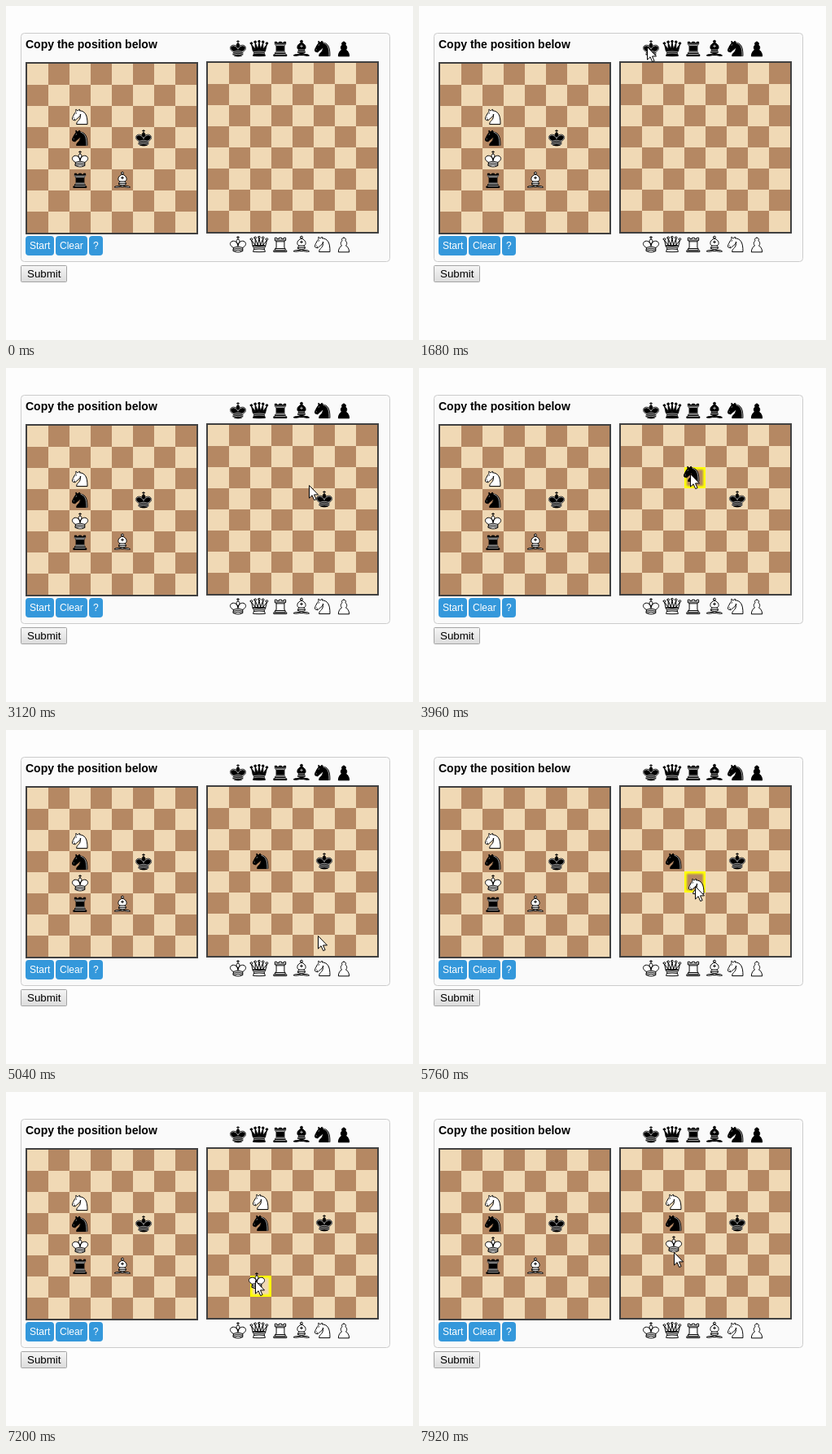
An HTML page for the animation above (8000 ms loop, 500x411 px).

```html
<!DOCTYPE html>
<html lang="en">
<head>
<meta charset="utf-8">
<title>Copy the position</title>
<style>
  html, body { margin: 0; width: 100%; height: 100%; overflow: hidden; background: #fdfdfd; }
  svg { display: block; }
  text { font-family: "Liberation Sans", Arial, sans-serif; }
  .piece { stroke: #000; stroke-width: 1.7; stroke-linecap: round; stroke-linejoin: round; }
  .light { stroke: #eee; stroke-width: 1.2; }
</style>
</head>
<body>
<svg id="stage" width="500" height="411" viewBox="0 0 500 411">
  <defs>
    <linearGradient id="face" x2="0" y2="1">
      <stop stop-color="#f5f5f5"/><stop offset="1" stop-color="#dcdcdc"/>
    </linearGradient>
  </defs>
  <rect x="18.5" y="33.5" width="453" height="281" rx="4" fill="#fafafa" stroke="#ccc"/>
  <text x="24" y="52" font-size="14" font-weight="bold">Copy the position below</text>
  <g id="buttons" font-size="12"></g>
  <rect x="18.5" y="319.5" width="56" height="20" rx="1" fill="url(#face)" stroke="#a3a3a3"/>
  <text x="26" y="334" font-size="13.333">Submit</text>
  <g id="boards"></g>
  <svg id="hover" width="26" height="26">
    <rect x="-2" y="-2" width="30" height="30" fill="none" stroke="#ff0" stroke-width="10" style="filter:blur(1px)"/>
  </svg>
  <g id="pieces"></g>
  <path id="cursor" d="M.5.5v15.6l3.6-3.4 2.6 5.9 2.4-1-2.6-5.7h5z" fill="#fff" stroke="#000"/>
</svg>
<script>
const $ = id => document.getElementById(id);
const CELL = 26, LOOP = 8000, TICK = 120;
const LEFT = { x: 26, y: 71 }, RIGHT = { x: 248, y: 70 };

// Piece shapes live on a 45-unit grid, symmetric about MID
const MID = 22.5;
const ball = (x, y, r) => `M${x - r} ${y}a${r} ${r} 0 1 0 ${2 * r} 0 ${r} ${r} 0 1 0-${2 * r} 0z`;
const bar = (y, half) => `M${MID - half} ${y}h${2 * half}`;
const slab = (y, half, height) => `${bar(y, half)}v${height}h${-2 * half}z`;
const arch = (y, half, rise) => `M${MID - half} ${y}q${half} ${-rise} ${2 * half} 0`;

function queenCrown() {
  let balls = '', rim = 'M9 26';
  for (let i = -2; i <= 2; i++) {
    const x = MID + 8.25 * i, y = 8 + i * i;
    balls += ball(x, y, 2.2);
    rim += `L${x} ${y + 2}`;
    if (i < 2) rim += `L${MID + 5.6 * (i + .5)} 24.7`;
  }
  return balls + rim + 'L36 26z';
}

// body: filled outline; lines: inner detail; light: extra detail on black pieces
const SHAPES = {
  K: {
    body: 'M22.5 11.6V6M20 8h5M22.5 25s4.5-7.5 3-10.5c-1-3.3-5-3.3-6 0-1.5 3 3 10.5 3 10.5' +
      'M12.5 37c5.5 3.5 14.5 3.5 20 0v-7s9-4.5 6-10.5c-4-6.5-13.5-3.5-16 4V27v-3.5c-2.5-7.5-12-10.5-16-4-3 6 6 10.5 6 10.5z',
    lines: [30, 33.5, 37].map(y => arch(y, 10, 4.5)).join(''),
    light: 'M32 29.5s8.5-4 6-9.7C34.1 14 25 18 22.5 24.6 20 18 10.9 14 7 19.9c-2.5 5.6 4.9 9 4.9 9'
  },
  Q: {
    body: queenCrown() + 'M9 26c0 4 4 4 2 9l-1.5 3.5c6.5 1 19.5 1 26 0L34 35c-2-5 2-5 2-9-8.5-1.5-18.5-1.5-27 0z',
    lines: arch(30, 11, 1.5) + arch(33.5, 10.5, 1.5)
  },
  R: {
    body: slab(36, 13.5, 3) + slab(32, 10.5, 4) +
      'M11 14V9h4v2h5V9h5v2h5V9h4v5l-3 3H14zM31 17v12.5l1.5 2.5h-20l1.5-2.5V17',
    lines: bar(14, 11.5),
    light: bar(35.5, 10.5) + bar(31.5, 9.5) + bar(29.5, 8.5) + bar(16.5, 8.5)
  },
  B: {
    body: ball(MID, 8, 2.5) +
      'M9 36c3.4-1 10.1.4 13.5-2 3.4 2.4 10.1 1 13.5 2l3 2c-4 2-12-1.5-16.5-.5-4.5-1-12.5 2.5-16.5.5z' +
      'M15 32c2.5 2.5 12.5 2.5 15 0 .5-1.5 0-2 0-2 0-2.5-2.5-4-2.5-4 5.5-1.5 6-11.5-5-15.5-11 4-10.5 14-5 15.5 0 0-2.5 1.5-2.5 4 0 0-.5.5 0 2z',
    lines: bar(26, 5) + bar(30, 7.5) + bar(18, 2.5) + 'M22.5 15.5v5'
  },
  N: {
    body: 'M22 10c10.5 1 16.5 8 16 29H15c0-9 10-6.5 8-21' +
      'M24 18c.4 2.9-5.6 7.4-8 9-3 2-2.8 4.3-5 4-1-.9 1.4-3 0-3-1 0 .2 1.2-1 2-1 0-4 1-4-4 0-2 6-12 6-12s1.9-1.9 2-3.5c-.7-1-.5-2-.5-3 1-1 3 2.5 3 2.5h2s.8-2 2.5-3c1 0 1 3 1 3',
    lines: 'M9 25.5h.1M14.7 15l-.5 1',
    light: 'M24.5 11.2C32 13 37 20 36.3 39'
  },
  P: {
    body: 'M22.5 9c-4 0-5.5 4-3.2 6.4-3.6 2-4.5 7.6-.9 10.6-3 1.1-7.4 5.6-7.4 13.5h23c0-7.9-4.4-12.4-7.4-13.5 3.6-3 2.7-8.6-.9-10.6C28 13 26.5 9 22.5 9z',
    lines: ''
  }
};

// Upper-case codes are white, lower-case black
function piece(code, cx, cy) {
  const { body, lines, light = '' } = SHAPES[code.toUpperCase()];
  const black = code > 'Z';
  return `<g class="piece" transform="translate(${cx - 13} ${cy - 13}) scale(${CELL / 45})">
    <path d="${body}" fill="${black ? '#000' : '#fff'}"/>
    <path d="${black ? lines + light : lines}" fill="none" class="${black ? 'light' : ''}"/></g>`;
}

// A man is a piece code and its square, such as "Nc6"
const place = (board, [code, file, rank]) => piece(code,
  board.x + (file.charCodeAt(0) - 97) * CELL + 13,
  board.y + (8 - rank) * CELL + 13);

function boardMarkup({ x, y }) {
  let dark = '';
  for (let i = 0; i < 64; i++) {
    const col = i % 8, row = i >> 3;
    if ((col + row) % 2) dark += `M${x + col * CELL} ${y + row * CELL}h26v26h-26z`;
  }
  return `<rect x="${x - 1}" y="${y - 1}" width="210" height="210" fill="#f0d9b5" stroke="#404040" stroke-width="2"/>
    <path d="${dark}" fill="#b58863" shape-rendering="crispEdges"/>`;
}

const spares = [...'KQRBNP'].map((code, i) =>
  piece(code.toLowerCase(), 285 + i * CELL, 52) + piece(code, 285 + i * CELL, 293)).join('');
const position = ['Nc6', 'nc5', 'kf5', 'Kc4', 'rc3', 'Be3'];

$('boards').innerHTML = boardMarkup(LEFT) + boardMarkup(RIGHT) + spares +
  position.map(man => place(LEFT, man)).join('');
$('buttons').innerHTML = [['Start', 24, 35], ['Clear', 61, 39], ['?', 102, 17]].map(([label, x, w]) =>
  `<rect x="${x}" y="283" width="${w}" height="24" rx="4" fill="#3498db"/>
   <text x="${x + 5}" y="299" fill="#fff">${label}</text>`).join('');

// Each gesture follows a quadratic curve from the last resting point; some carry a man until drop
const START = [454, 323];
const gestures = [
  { from: 1080, until: 1680, via: [340, 100], to: [281, 51] },
  { from: 1800, until: 2640, via: [317, 140], to: [387, 159], man: 'kf5', drop: 2760 },
  { from: 2760, until: 3600, via: [358, 171], to: [389, 51] },
  { from: 3600, until: 4320, via: [319, 157], to: [309, 159], man: 'nc5', drop: 4440 },
  { from: 4680, until: 5160, via: [389, 217], to: [389, 289] },
  { from: 5280, until: 6120, via: [341, 195], to: [312, 136], man: 'Nc6', drop: 6120 },
  { from: 6120, until: 6720, via: [357, 306], to: [285, 293] },
  { from: 6840, until: 7560, via: [315, 221], to: [314, 198], man: 'Kc4', drop: 7800 }
];

function pointerAt(t) {
  let rest = START;
  for (const { from, until, via, to } of gestures) {
    if (t < from) break;
    const k = Math.min(1, (t - from) / (until - from)), j = 1 - k;
    rest = rest.map((a, i) => Math.round(j * j * a + 2 * j * k * via[i] + k * k * to[i]));
  }
  return rest;
}

let shown = -1;
function frame(now) {
  requestAnimationFrame(frame);
  const t = Math.floor(now % LOOP / TICK) * TICK;
  if (t === shown) return;
  shown = t;

  const [x, y] = pointerAt(t);
  $('cursor').setAttribute('transform', `translate(${x - 1} ${y - 1})`);
  $('cursor').style.display = t < gestures[0].from ? 'none' : '';

  const begun = gestures.filter(g => g.man && t > g.from);
  $('pieces').innerHTML = begun.map(({ man, drop }) =>
    t < drop ? piece(man[0], x + 1, y - 1) : place(RIGHT, man)).join('');

  const col = Math.floor((x - RIGHT.x) / CELL), row = Math.floor((y - RIGHT.y) / CELL);
  const over = Math.min(col, row) >= 0 && Math.max(col, row) < 8;
  const held = begun.some(g => t < g.drop);
  $('hover').style.display = over && held ? '' : 'none';
  $('hover').setAttribute('x', RIGHT.x + col * CELL);
  $('hover').setAttribute('y', RIGHT.y + row * CELL);
}
frame(performance.now());
</script>
</body>
</html>
```
